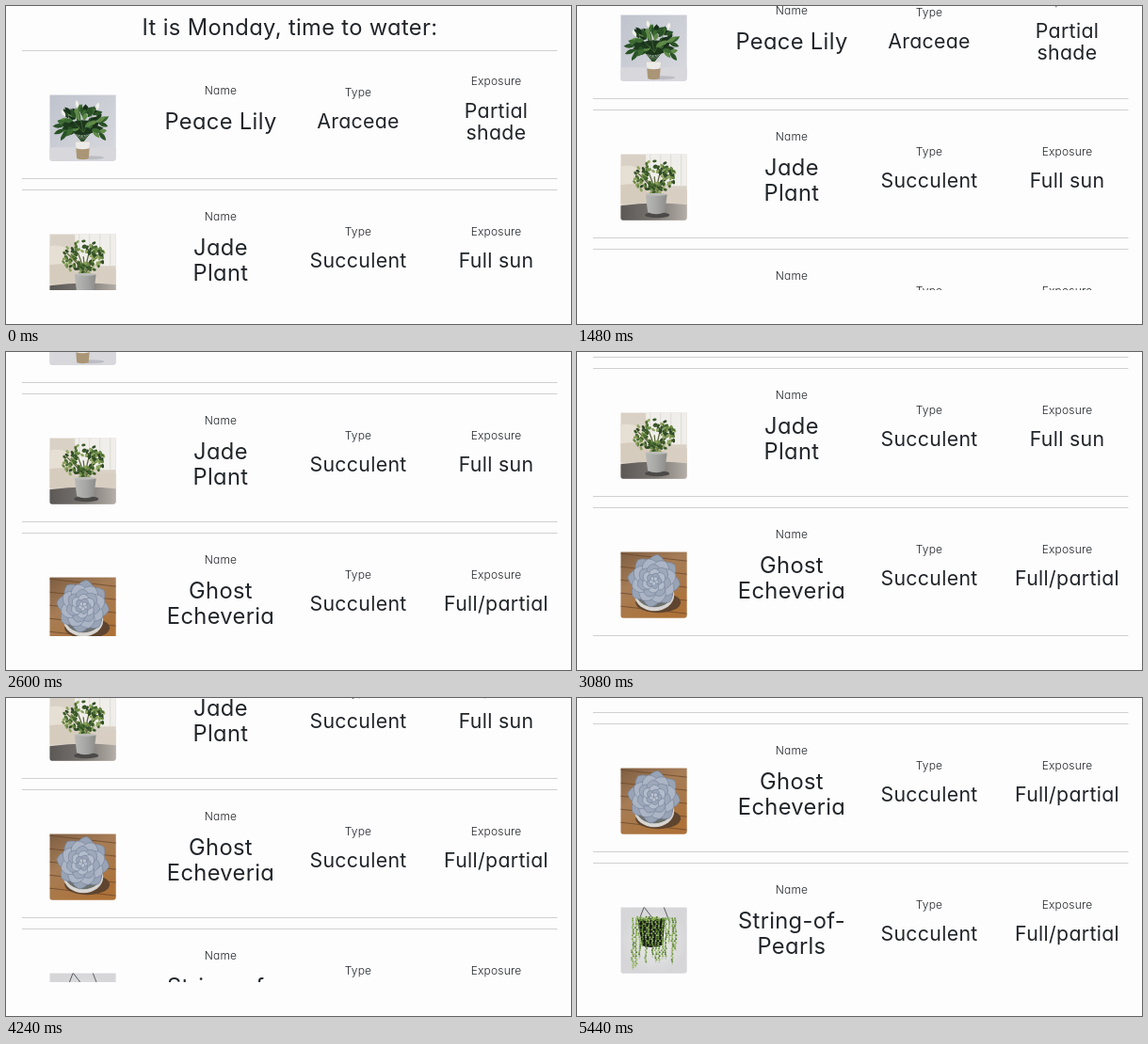
Animation, 600 px wide and 338 px high, one loop 5.48 s. Source, as an HTML page:

```html
<!DOCTYPE html>
<html lang="en">
<head>
<meta charset="utf-8">
<title>Plants to water</title>
<style>
  html, body { margin: 0; width: 100%; height: 100%; overflow: hidden; background: #fefdfe; }
  svg { display: block; width: 600px; height: 338px; }
  text {
    font-family: Inter, Lato, sans-serif;
    font-feature-settings: "cv11";
    font-weight: 380;
    letter-spacing: .015em;
    fill: #212529;
    text-anchor: middle;
  }
  .big { font-size: 23.7px; }
  .mid { font-size: 21.3px; }
  .label { font-size: 12px; font-weight: 350; }
  .rule { fill: #d0d0d1; }
</style>
</head>
<body>
<svg viewBox="0 0 600 338">
  <defs>
    <clipPath id="view"><rect width="600" height="302"/></clipPath>
    <clipPath id="photo"><path d="M0 0H70.5V67.5Q70.5 70.5 67.5 70.5H3Q0 70.5 0 67.5Z"/></clipPath>
    <linearGradient id="wall" x2="1" y2="1"><stop stop-color="#bfc3cd"/><stop offset="1" stop-color="#d9dadf"/></linearGradient>
    <linearGradient id="wood" x2=".6" y2="1"><stop stop-color="#7d5d42"/><stop offset=".45" stop-color="#a67d56"/><stop offset="1" stop-color="#ad7238"/></linearGradient>
    <linearGradient id="table"><stop stop-color="#5b5856"/><stop offset=".5" stop-color="#77736f"/><stop offset="1" stop-color="#b5afa8"/></linearGradient>
    <linearGradient id="pot"><stop stop-color="#b9bab7"/><stop offset=".5" stop-color="#a7a8a5"/><stop offset="1" stop-color="#8b8c89"/></linearGradient>
    <radialGradient id="studio"><stop stop-color="#ebebec"/><stop offset="1" stop-color="#d6d6d8"/></radialGradient>
  </defs>
  <g clip-path="url(#view)"><g id="page"></g></g>
</svg>
<script>
const LOOP = 5480, STEP = 40, PITCH = 148;
const scrollKeys = [[0, 0], [760, 43], [1480, 85], [2600, 151], [3600, 208], [4240, 246], [5480, 318]];

function seeded(seed) {
  return () => (seed = (seed * 16807) % 2147483647) / 2147483647;
}
const repeat = (n, fn) => Array.from({ length: n }, (_, i) => fn(i)).join("");
const pick = (list, r) => list[Math.floor(r * list.length)];
const rect = (x, y, w, h, fill) => `<rect x="${x}" y="${y}" width="${w}" height="${h}" fill="${fill}"/>`;
const shape = (d, fill) => `<path d="${d}" fill="${fill}"/>`;
const line = (d, color, width) => `<path d="${d}" fill="none" stroke="${color}" stroke-width="${width}"/>`;
const oval = (x, y, rx, ry, fill, turn = 0) =>
  `<ellipse cx="${x}" cy="${y}" rx="${rx}" ry="${ry}" fill="${fill}" transform="rotate(${turn} ${x} ${y})"/>`;
// Pointed leaf that grows from (x, y) in the given direction.
const leaf = (x, y, len, half, turn, fill) =>
  `<path d="M0 0Q${len * .5} ${-half * 2} ${len} 0Q${len * .5} ${half * 2} 0 0" fill="${fill}" transform="translate(${x} ${y}) rotate(${turn})"/>`;

function lily() {
  const rnd = seeded(41), greens = ["#1d3a1d", "#2a5227", "#3c6b33", "#17301a", "#5f8a48"];
  const stems = repeat(9, i => line(`M35 51L${23 + i * 3} 36`, "#2c4d26", 1));
  const leaves = repeat(64, () => {
    const a = -205 + rnd() * 230, d = 2 + rnd() * 15, r = a * Math.PI / 180;
    return leaf(35 + d * 1.15 * Math.cos(r), 34 + d * Math.sin(r), 8 + rnd() * 5, 2.3, a + rnd() * 90 - 45, pick(greens, rnd()));
  });
  const blooms = [[50, 13, -75], [30, 11, -100], [17, 20, -125]]
    .map(([x, y, a]) => line(`M${x} ${y}L36 40`, "#4d7740", .6) + leaf(x, y + 3, 8, 1.8, a, "#f0f0e8")).join("");
  return rect(0, 0, 71, 71, "url(#wall)") + rect(0, 56, 71, 15, "#d7d7dc") +
    oval(44, 67, 14, 2, "#bcbcc3") + stems + oval(35, 35, 15, 8, "#1c361c") + leaves + blooms +
    shape("M27.5 50H43L41.5 68Q35 70 29 68Z", "#aa9676") +
    shape("M27.5 50H43L42.4 57Q35 59 28 57Z", "#ecebe8");
}

function jade() {
  const rnd = seeded(97), greens = ["#3b5a2a", "#4c6e32", "#6b8a45", "#2f4a25", "#8ea35f"];
  const leaves = repeat(130, () => {
    const a = rnd() * 6.283, d = .35 + .65 * rnd();
    return oval(36 + 24 * d * Math.cos(a), 25 + 18 * d * Math.sin(a), 2.2, 1.4, pick(greens, rnd()), rnd() * 180);
  });
  const stems = repeat(7, i => line(`M38 46Q${34 + i} 34 ${18 + i * 6} ${20 + i % 2 * 4}`, "#5f6a40", 1.3));
  return rect(0, 0, 71, 71, "#d9d1c5") + rect(27, 0, 44, 34, "#f0eeea") +
    repeat(4, i => rect(31 + i * 11, 0, 1, 34, "#dfdbd5")) +
    shape("M0 13Q14 11 24 18V36H0Z", "#e6dfd3") + shape("M0 33Q24 30 32 37V53H0Z", "#d6ccbe") +
    rect(45, 38, 26, 17, "#d8cfc2") + shape("M0 55Q35 50 71 54V71H0Z", "url(#table)") +
    oval(39, 65, 13, 3, "#4c4a49") + stems + leaves +
    shape("M26.5 43H49.5L47 62Q38 66 29 62Z", "url(#pot)") + oval(38, 43, 11.5, 1.5, "#bcbdb9");
}

function echeveria() {
  const rings = [[8, 28, 8, "#98a3b5", 8], [8, 24, 7.5, "#abb5c5", 30], [7, 18, 6, "#9da8ba", 10],
    [6, 13, 4.8, "#b3bccb", 35], [5, 8.5, 3.2, "#9aa5b8", 5], [5, 5, 1.8, "#bcc4d1", 20]];
  const petal = (len, half, turn, fill) =>
    `<path d="M0 0C${len * .4} ${-half * 1.6} ${len * .86} ${-half * 1.5} ${len} 0C${len * .86} ${half * 1.5} ${len * .4} ${half * 1.6} 0 0" fill="${fill}" stroke="#76829a" stroke-width=".6" transform="translate(35.5 31) rotate(${turn})"/>`;
  return rect(0, 0, 71, 71, "url(#wood)") +
    repeat(6, i => line(`M0 ${2 + i * 14}L71 ${10 + i * 14}`, "#6d4a2c", .8)) +
    oval(40, 54, 24, 11, "#5f4530") + oval(36, 46, 21, 17, "#d7d5d1") + oval(36, 43, 20, 16, "#6c706f") +
    rings.map(([n, len, half, fill, start]) => repeat(n, i => petal(len, half, start + i * 360 / n, fill))).join("");
}

function pearls() {
  const rnd = seeded(23), greens = ["#6d9440", "#83aa4f", "#557a30", "#9bbd6a"];
  const dot = (x, y) => oval(x.toFixed(1), y.toFixed(1), 1, 1, pick(greens, rnd()));
  const crown = repeat(45, () => dot(18 + rnd() * 34, 10.5 + rnd() * 4));
  const strands = repeat(14, i => {
    const x = 13 + i * 3.5, end = 38 + rnd() * 31;
    return line(`M${x} 13V${end}`, "#7a9c4b", .4) +
      repeat(Math.floor((end - 12) / 2), k => dot(x + rnd() * 2.4 - 1.2, 12 + k * 2));
  });
  return rect(0, 0, 71, 71, "url(#studio)") +
    line("M25 0L20 13M46 0L51 13M25 0L35 13", "#4b4e57", .9) +
    shape("M18 12H47L45 40Q34 45 23 41Z", "#171a18") + crown + strands;
}

const cards = [
  { photo: lily, name: ["Peace Lily"], type: "Araceae", exposure: ["Partial", "shade"] },
  { photo: jade, name: ["Jade", "Plant"], type: "Succulent", exposure: ["Full sun"] },
  { photo: echeveria, name: ["Ghost", "Echeveria"], type: "Succulent", exposure: ["Full/partial"] },
  { photo: pearls, name: ["String-of-", "Pearls"], type: "Succulent", exposure: ["Full/partial"] }
];

const text = (kind, x, y, s) => `<text class="${kind}" x="${x}" y="${y}">${s}</text>`;
const rule = y => `<rect class="rule" x="17" y="${y}" width="568.5" height="1"/>`;

// One column: a label above one or two lines, centred on the card.
function column(kind, x, label, lines, labelY, firstY, gap) {
  return text("label", x, labelY, label) + lines.map((s, i) => text(kind, x, firstY + i * gap, s)).join("");
}

function card(c, i) {
  const tall = c.name.length > 1, split = c.exposure.length > 1;
  return `<g transform="translate(0 ${i * PITCH})">` + rule(47) + rule(183) +
    `<g transform="translate(46.2 94.2)"><g clip-path="url(#photo)">${c.photo()}</g></g>` +
    column("big", 228, "Name", c.name, tall ? 80 : 94, tall ? 117 : 131, 27) +
    column("mid", 374, "Type", [c.type], 95.5, 129.5, 0) +
    column("mid", 520.5, "Exposure", c.exposure, split ? 84 : 95.5, split ? 118.5 : 129.5, 23) + "</g>";
}

const page = document.getElementById("page");
page.innerHTML = text("big", 301.5, 31, "It is Monday, time to water:") + cards.map(card).join("");

function scrollAt(t) {
  const i = scrollKeys.findIndex(k => k[0] > t);
  const [t0, y0] = scrollKeys[i - 1], [t1, y1] = scrollKeys[i];
  return Math.round(y0 + (y1 - y0) * (t - t0) / (t1 - t0));
}

const start = performance.now();
function draw() {
  const t = (performance.now() - start) % LOOP;
  page.setAttribute("transform", `translate(0 ${-scrollAt(Math.floor(t / STEP) * STEP)})`);
  requestAnimationFrame(draw);
}
draw();
</script>
</body>
</html>
```
